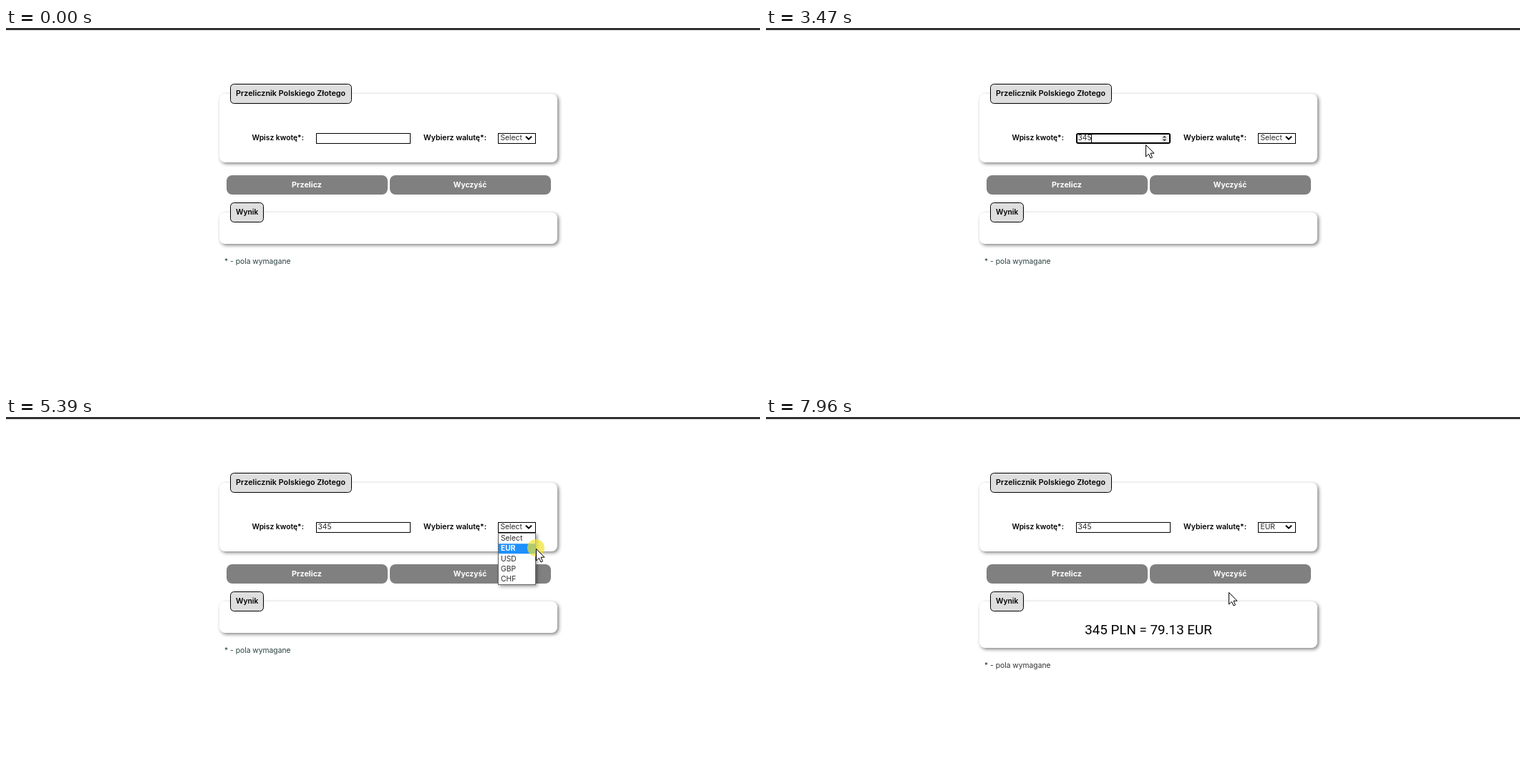
These frames come from a looping animation (1053 px wide and 505 px high, 8 s). An HTML page:

```html
<!DOCTYPE html>
<html lang="pl">
<head>
<meta charset="utf-8">
<title>Przelicznik</title>
<style>
  html, body { margin: 0; width: 100%; height: 100%; overflow: hidden; background: #fff; }
  svg { display: block; width: 1053px; height: 505px; }
  text { font: 10.3px Inter, "Noto Sans", sans-serif; fill: #2b2b2b; white-space: pre; }
  .bold { font-weight: 600; fill: #000; }
  .title { font-size: 10.8px; }
  .mid { text-anchor: middle; }
  .white { fill: #fff; font-weight: 700; }
  .panel { fill: #fff; filter: drop-shadow(2px 2px 2.5px #808080); }
  .legend { fill: #dedede; stroke: #000; }
  .button { fill: #808080; }
  .field { fill: #fff; stroke: #000; }
  #result { font: 18.8px Roboto, Inter, sans-serif; fill: #000; }
  #listBox { fill: #fff; stroke: #666; filter: drop-shadow(2px 2px 2.5px #0006); }
</style>
</head>
<body>
<svg viewBox="0 0 1053 505">
  <rect width="1053" height="3" fill="#333"/>

  <rect class="panel" x="298" y="92" width="472" height="96" rx="8"/>
  <rect class="legend" x="313.5" y="78.5" width="169" height="27" rx="5"/>
  <text class="bold title" x="321" y="95">Przelicznik Polskiego Złotego</text>
  <text class="bold" x="343.5" y="157">Wpisz kwotę*:</text>
  <text class="bold" x="583" y="157" style="font-size:10.5px">Wybierz walutę*:</text>

  <rect class="field" id="input"/>
  <g id="spinner">
    <rect x="551" y="149" width="12" height="11" fill="#efefef"/>
    <path d="M553.5 153.5l3-3 3 3zM553.5 155.5l3 3 3-3z" fill="#444"/>
  </g>
  <text id="amount" x="435.5" y="157"></text>
  <rect id="caret" y="149" width="1" height="11"/>

  <rect class="field" id="select"/>
  <text id="choice" x="690.5" y="157"></text>
  <path d="M726 151.7l4 4 4-4" fill="none" stroke="#000" stroke-width="2"/>

  <rect class="button" x="308" y="206" width="225" height="27" rx="8"/>
  <rect class="button" x="536" y="206" width="225" height="27" rx="8"/>
  <text class="mid white" x="420" y="223" style="font-size:10.8px">Przelicz</text>
  <text class="mid white" x="648" y="223">Wyczyść</text>

  <rect class="panel" id="output" x="298" y="258" width="472" rx="8"/>
  <rect class="legend" x="313.5" y="244.5" width="46" height="27" rx="5"/>
  <text class="bold" x="321" y="261">Wynik</text>
  <text class="mid" id="result" x="534" y="304">345 PLN = 79.13 EUR</text>
  <text id="note" x="305" >* - pola wymagane</text>

  <g id="list">
    <rect id="listBox" x="687.5" y="162.5" width="52" height="72"/>
    <rect id="mark" x="688" width="51" height="14" fill="#1e90ff"/>
  </g>

  <circle id="flash" r="12" fill="#f0e22c" fill-opacity=".7"/>
  <path id="arrow" d="M.5.5V17l4-3.7L7 19l2.5-1.1L7 12.2h5z" fill="#fff" stroke="#000"/>
  <path id="beam" d="M-3-7.5h2.5l.5.5.5-.5H3M0-7V7M-3 7.5h2.5L0 7l.5.5H3" fill="none" stroke="#000"/>
</svg>
<script>
const LOOP = 8000, STEP = 1000 / 15;
const $ = id => document.getElementById(id);
const show = (id, on) => { $(id).style.display = on ? "" : "none"; };
const set = (id, attrs) => { for (const k in attrs) $(id).setAttribute(k, attrs[k]); };
const within = (t, a, b) => t >= a && t < b;

// Pointer path: time, x, y
const path = [
  [866, 790, 240], [933, 760, 230], [1466, 488, 151], [1620, 488, 151], [1666, 490, 154],
  [1866, 490, 154], [2266, 518, 192], [2600, 518, 192], [3133, 520, 179],
  [3466, 530, 163], [3800, 643, 167], [3950, 732, 164], [4200, 711, 157],
  [4660, 711, 157], [4930, 740, 184], [5510, 740, 184], [6000, 402, 215],
  [6130, 415, 216], [6200, 416, 216], [6600, 416, 216], [6666, 417, 216],
  [7200, 417, 216], [7266, 418, 216], [7933, 646, 245]
];

function pointer(t) {
  const i = path.findIndex(p => p[0] > t);
  if (i < 0) return path[path.length - 1].slice(1);
  if (i === 0) return path[0].slice(1);
  const [t0, x0, y0] = path[i - 1], [t1, x1, y1] = path[i];
  const u = (t - t0) / (t1 - t0), e = u * u * (3 - 2 * u);
  return [Math.round(x0 + (x1 - x0) * e), Math.round(y0 + (y1 - y0) * e)];
}

const options = ["Select", "EUR", "USD", "GBP", "CHF"].map((name, i) => {
  const el = document.createElementNS("http://www.w3.org/2000/svg", "text");
  el.textContent = name;
  el.setAttribute("x", 691);
  el.setAttribute("y", 173 + i * 14.25);
  $("list").append(el);
  return el;
});

function field(id, x, width, focus) {
  const d = focus ? 1 : .5;
  set(id, { x: x + d, y: 147 + d, width: width - 2 * d, height: 15 - 2 * d,
            rx: focus ? 2 : 0, "stroke-width": 2 * d });
}

function draw(t) {
  const [x, y] = pointer(Math.floor((t + 5) / STEP) * STEP);
  const visible = t >= 920 && !within(t, 2600, 3130);
  const overInput = visible && x >= 433 && x < 565 && y >= 147 && y < 162;

  const focus = within(t, 1620, 4410);
  const typed = [2600, 2735, 3010].filter(k => t >= k);
  const blinkStart = typed.length ? typed[typed.length - 1] : 1620;
  field("input", 433, 132, focus);
  show("spinner", focus || overInput);
  $("amount").textContent = "345".slice(0, typed.length);
  show("caret", focus && (t - blinkStart) % 1000 < 500);
  set("caret", { x: 435 + Math.round(6.4 * typed.length) });

  const picked = t >= 5450;
  field("select", 687, 53, within(t, 5450, 6550));
  $("choice").textContent = picked ? "EUR" : "Select";
  show("list", within(t, 4410, 5450));
  const hot = y > 177 ? 1 : 0;
  set("mark", { y: 163 + hot * 14.25 });
  options.forEach((el, i) => el.setAttribute("class", i === hot ? "white" : ""));

  const done = t >= 6610;
  set("output", { height: done ? 65 : 44 });
  show("result", done);
  set("note", { y: done ? 351 : 330 });
  $("note").style.fill = done ? "#333" : "#2a4240";

  show("flash", within(t, 1620, 1680) || within(t, 4410, 4660) ||
                within(t, 5390, 5520) || within(t, 6550, 6680));
  show("arrow", visible && !overInput);
  show("beam", overInput);
  set("flash", { cx: x, cy: overInput ? y : y - 1 });
  set("arrow", { transform: `translate(${x} ${y})` });
  set("beam", { transform: `translate(${x + .5} ${y})` });
}

const start = performance.now();
function tick() {
  draw((performance.now() - start) % LOOP);
  requestAnimationFrame(tick);
}
tick();
</script>
</body>
</html>
```
